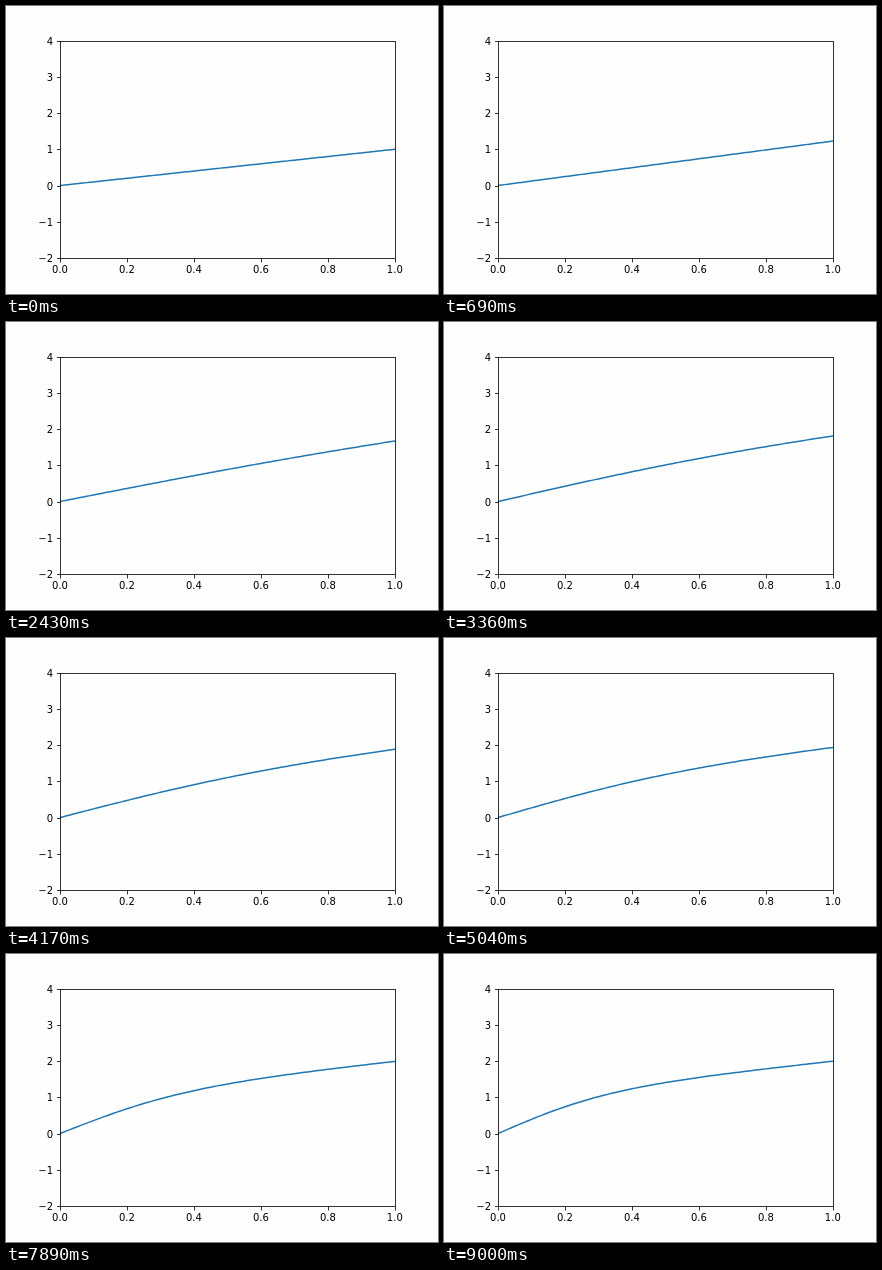
An HTML page with a canvas for the animation above (9030 ms loop, 432 by 288 pixels).

```html
<!DOCTYPE html>
<html lang="en">
<head>
<meta charset="utf-8">
<title>x + tanh(kx)</title>
<style>
  html, body { margin: 0; width: 100%; height: 100%; overflow: hidden; background: #fefefe; }
  canvas { display: block; }
</style>
</head>
<body>
<canvas id="plot" width="432" height="288"></canvas>
<script>
const ctx = document.getElementById('plot').getContext('2d');
const LEFT = 54, RIGHT = 388.8, TOP = 34.56, BOTTOM = 252;
const STEP = 30, FRAMES = 301;

const px = x => LEFT + x * (RIGHT - LEFT);
const py = y => BOTTOM - (y + 2) / 6 * (BOTTOM - TOP);
const snap = v => Math.round(v) + 0.5;

function segment(x1, y1, x2, y2) {
  ctx.beginPath();
  ctx.moveTo(x1, y1);
  ctx.lineTo(x2, y2);
  ctx.stroke();
}

function drawCurve(k) {
  ctx.save();
  ctx.beginPath();
  ctx.rect(54, 35, 335, 217);
  ctx.clip();
  ctx.strokeStyle = '#1f77b4';
  ctx.lineWidth = 1.5;
  ctx.lineCap = 'square';
  ctx.lineJoin = 'round';
  ctx.beginPath();
  for (let i = 0; i <= 100; i++) {
    const x = i / 100;
    ctx.lineTo(px(x), py(x + Math.tanh(k * x)));
  }
  ctx.stroke();
  ctx.restore();
}

function drawAxes() {
  ctx.strokeStyle = ctx.fillStyle = '#000';
  ctx.lineWidth = 0.8;
  ctx.font = '10px "DejaVu Sans", sans-serif';
  ctx.strokeRect(54.5, 35.5, 335, 217);

  ctx.textAlign = 'center';
  for (let i = 0; i <= 5; i++) {
    const x = px(i / 5), sx = snap(x);
    segment(sx, 252.5, sx, 256.5);
    ctx.fillText((i / 5).toFixed(1), x, 267);
  }

  ctx.textAlign = 'right';
  for (let v = -2; v <= 4; v++) {
    const y = py(v), sy = snap(y);
    segment(51, sy, 54.5, sy);
    ctx.fillText(String(v).replace('-', '\u2212'), 47, Math.round(y + 4));
  }
}

function render() {
  const frame = Math.floor(performance.now() / STEP) % FRAMES;
  ctx.fillStyle = '#fefefe';
  ctx.fillRect(0, 0, 432, 288);
  drawCurve(frame / 100);
  drawAxes();
  requestAnimationFrame(render);
}
render();
</script>
</body>
</html>
```
